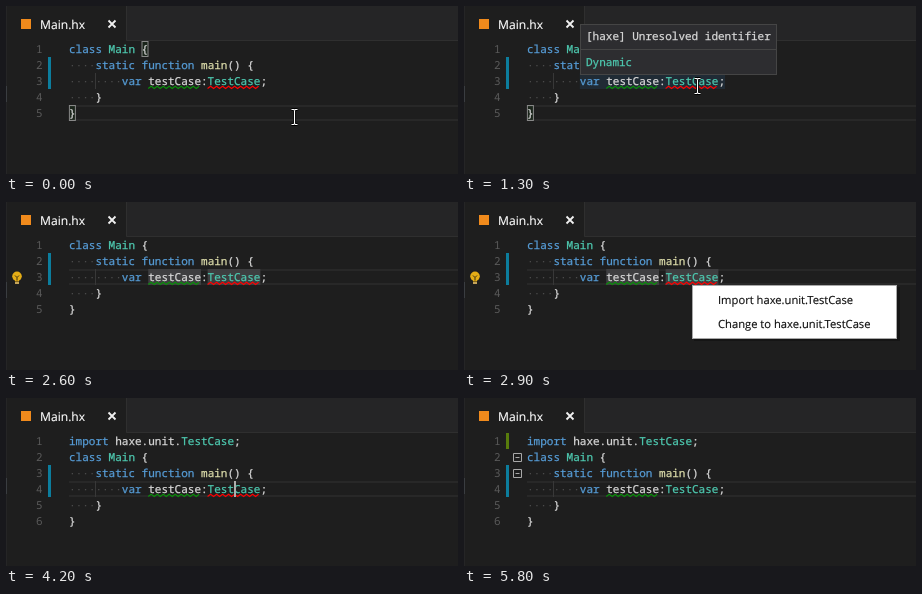
Recreate the animation shown at these times as an HTML page. Size 452 by 168 pixels, loop 6.4 s.

```html
<!DOCTYPE html>
<html lang="en">
<head>
<meta charset="utf-8">
<title>Editor quick fix</title>
<style>
  html, body { margin: 0; width: 100%; height: 100%; overflow: hidden; background: #1e1e1e; }
  svg { display: block; width: 452px; height: 168px; }
  text { white-space: pre; text-rendering: geometricPrecision; }
  text, tspan { fill: currentColor; stroke: currentColor; stroke-width: .25px; }
  .code { font: 11px "Noto Sans Mono", "DejaVu Sans Mono", monospace; color: #d8d8d8; }
  .ui { font: 11.2px "Open Sans", "Noto Sans", sans-serif; stroke-width: .15px; }
  .key { color: #569cd6; }
  .type { color: #4ec9b0; }
  .func { color: #dcdcaa; }
  .num { color: #5a5a5a; stroke: none; }
</style>
</head>
<body>
<svg id="stage" viewBox="0 0 452 168"></svg>
<script>
const LOOP = 6400, STEP = 100;
const LEFT = 63, TOP = 35, CHAR = 6.6, ROW = 16;
const stage = document.getElementById('stage');

const colX = col => LEFT + col * CHAR;
const rowY = row => TOP + row * ROW;
const rect = (x, y, w, h, fill, more = '') =>
  `<rect x="${x}" y="${y}" width="${w}" height="${h}" fill="${fill}" ${more}/>`;
const path = (d, stroke, width = 1, more = '') =>
  `<path d="${d}" fill="none" stroke="${stroke}" stroke-width="${width}" ${more}/>`;
const text = (x, y, body, cls = 'code', style = '') =>
  `<text x="${x}" y="${y}" class="${cls}" style="${style}">${body}</text>`;
const span = cls => s => `<tspan class="${cls}">${s}</tspan>`;
const key = span('key'), type = span('type'), func = span('func');

const IMPORT = { col: 0, body: `${key('import')} haxe.unit.${type('TestCase')};` };
const CLASS = [
  { col: 0, body: `${key('class')} ${type('Main')} {` },
  { col: 4, body: `${key('static')} ${key('function')} ${func('main')}() {` },
  { col: 8, body: `${key('var')} testCase:${type('TestCase')};` },
  { col: 4, body: '}' },
  { col: 0, body: '}' }
];

function tabBar() {
  return rect(0, 0, 452, 168, '#1e1e1e') +
    rect(120, 0, 332, 35, '#252526') +
    path('M120.5 0V34.5H452', '#2f2f2f') +
    rect(0, 0, 1, 168, '#252526') +
    rect(0, 80, 1, 16, '#3a3d41') +
    rect(15, 13, 10, 10, '#f08a1c') +
    text(34, 23, 'Main.hx', 'ui', 'color:#fff;font-size:12.1px') +
    path('M102.5 14.5l7 7m0-7l-7 7', '#f0f0f0', 1.8);
}

function codeLine({ col, body }, row) {
  const y = rowY(row);
  let out = text(30, y + 12, row + 1, 'code num');
  for (let i = 0; i < col; i++)
    out += rect((colX(i + .5) - .6).toFixed(1), y + 8, 1.3, 1.3, '#4a4a4a');
  if (col > 4) out += rect(89, y, 1, ROW, '#383838');
  return out + text(colX(col), y + 12, body);
}

const activeLine = row =>
  rect(LEFT, rowY(row), 452 - LEFT, 2, '#282828') +
  rect(LEFT, rowY(row + 1) - 2, 452 - LEFT, 2, '#282828');

function squiggle(col, count, row, color) {
  const x0 = colX(col), x1 = colX(col + count), y = rowY(row) + 15.5;
  let d = `M${x0} ${y}`;
  for (let x = x0 + 3, up = true; x <= x1; x += 3, up = !up)
    d += `L${x} ${up ? y - 2.2 : y}`;
  return path(d, color, 1.1);
}

const bracket = (col, row) =>
  rect(colX(col) + .4, rowY(row) + .5, 6, 15, 'rgba(0,100,0,.1)', 'stroke="#888"');

const wordBox = (col, row) => rect(colX(col), rowY(row), 8 * CHAR, ROW, '#3e3e40');

function bulb() {
  return '<circle cx="11" cy="74.3" r="4.8" fill="#e5ad16"/>' +
    rect(9, 77, 4, 2.5, '#e5ad16') +
    path('M9 73.5l2 2 2-2M11 75.5v3', '#3a3010') +
    rect(9, 80, 4, 2, '#c5a55a');
}

function hoverBox(opacity) {
  return `<g opacity="${opacity}">` +
    rect(116.5, 18.5, 196, 50, '#2d2d30', 'stroke="#454545"') +
    rect(117, 43, 195, 1, '#454545') +
    text(122, 34, '[haxe] Unresolved identifier') +
    text(122, 60, type('Dynamic')) + '</g>';
}

function menu(picked) {
  return rect(230, 85, 206, 54, 'rgba(0,0,0,.3)') +
    rect(228.5, 83.5, 204, 53, '#fff', 'stroke="#a8a8a8"') +
    (picked ? rect(229, 86, 203, 24, '#4083f3') : '') +
    text(254, 102, 'Import haxe.unit.TestCase', 'ui', `color:${picked ? '#fff' : '#111'}`) +
    text(254, 126, 'Change to haxe.unit.TestCase', 'ui', 'color:#111');
}

function foldIcons(opacity) {
  return [1, 2].map(row => {
    const y = rowY(row) + 4;
    return path(`M49.5 ${y + .5}h8v8h-8zM51.5 ${y + 4.5}h4`, '#a8a8a8', 1, `opacity="${opacity}"`);
  }).join('');
}

function pointer(t) {
  const mix = (a, b, k) => a + (b - a) * k;
  const first = Math.min(t / 500, 1);
  const second = Math.min(Math.max((t - 600) / 200, 0), 1);
  const x = Math.floor(mix(mix(288, 256, first), 233, second)) + .5;
  const y = Math.round(mix(mix(111, 94, first), 80, second));
  const d = `M${x - 3} ${y - 7.5}h2.2l.8 .8 .8-.8h2.2M${x} ${y - 7}v14` +
    `M${x - 3} ${y + 7.5}h2.2l.8-.8 .8 .8h2.2`;
  return path(d, '#000', 2.8) + path(d, '#fff', 1.1);
}

function caretOn(t) {
  if (t < 2100 || t >= 5700) return false;
  return Math.floor((t - (t < 4200 ? 2100 : 4200)) / 500) % 2 === 0;
}

function draw(t) {
  const imported = t >= 4200;
  const shift = imported ? 1 : 0;
  const varRow = 2 + shift;
  const lines = imported ? [IMPORT, ...CLASS] : CLASS;
  let out = tabBar() + activeLine(t < 2100 ? 4 : varRow);

  if (t < 2100) out += bracket(11, 0) + bracket(0, 4);
  if (t >= 1200 && t < 2100) out += rect(colX(8), rowY(2), 22 * CHAR, ROW, 'rgba(38,79,120,.25)');
  if (t >= 2400 && !imported) out += wordBox(12, 2) + wordBox(21, 2);

  out += rect(42, rowY(1 + shift), 3, 2 * ROW, '#0c7d9d');
  if (t >= 4400) out += rect(42, TOP, 3, ROW, '#587c0c');
  out += lines.map(codeLine).join('');
  out += squiggle(12, 8, varRow, '#089008');
  if (t < 5300) out += squiggle(21, 8, varRow, '#f00');

  if (t >= 2100 && !imported) out += bulb();
  if (caretOn(t)) out += rect(228, rowY(varRow), 2, ROW, '#aeafad');
  if (t >= 5600) out += foldIcons(Math.min((t - 5500) / 300, 1));
  if (t >= 1200 && t < 2100) out += hoverBox(t < 1300 ? .5 : 1);
  if (t >= 2900 && t < 4100) out += menu(t >= 3600);
  if (t < 2300) out += pointer(t);
  stage.innerHTML = out;
}

let shown = -1;
const start = performance.now();
function tick() {
  const t = Math.floor((performance.now() - start) % LOOP / STEP) * STEP;
  if (t !== shown) draw(shown = t);
  requestAnimationFrame(tick);
}
tick();
</script>
</body>
</html>
```
